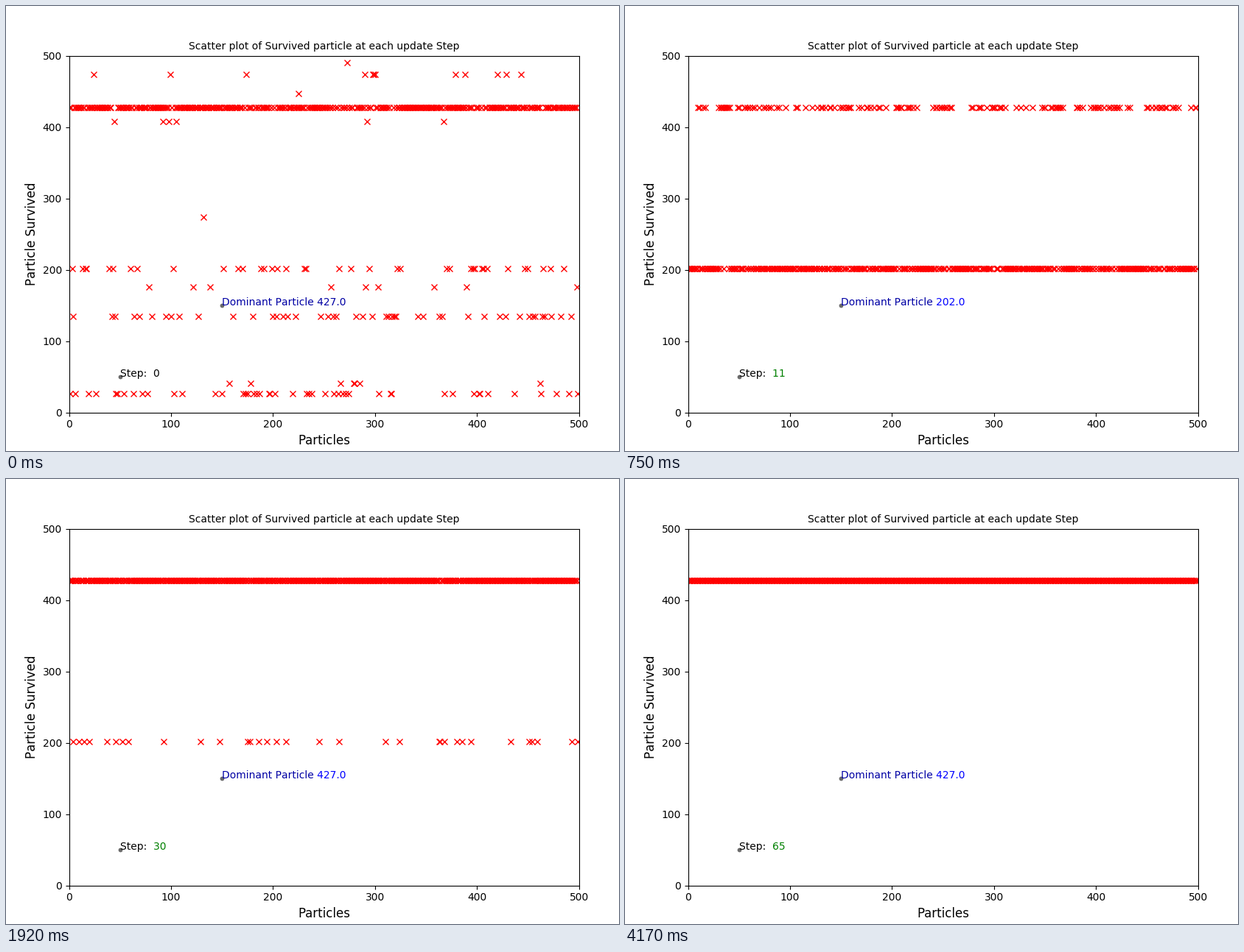
These frames come from a looping animation (832 px wide and 605 px high, 4.24 s). A matplotlib script:

```python
import numpy as np
import matplotlib.pyplot as plt
from matplotlib.animation import FuncAnimation
from matplotlib.transforms import Bbox, TransformedBbox

W, H, DPI = 832, 605, 100
LOOP, TICK, STEPS = 4240, 20, 66
LEAD = 24  # ms by which steps run ahead of an even split of the loop
N = 500
MAIN, RIVAL = 427, 202

plt.rcParams["font.family"] = "DejaVu Sans"
plt.rcParams["text.kerning_factor"] = 6  # whole-pixel kerning


def starting_levels():
    """Most particles on the main level, the others scattered over a few."""
    counts = {474: 12, 408: 6, RIVAL: 38, 176: 9, 135: 46, 41: 7, 26: 47}
    lone = {273: 490, 225: 447, 132: 274}
    minor = np.repeat(list(counts), list(counts.values()))
    levels = np.full(N, MAIN)
    rng = np.random.default_rng(7)
    levels[rng.choice(N, len(minor), replace=False)] = minor
    levels[list(lone)] = list(lone.values())
    return levels


first = starting_levels()
rest = first[(first != MAIN) & (first != RIVAL)]


def particles(step):
    """Levels of all particles after a number of resampling steps."""
    if step == 0:
        return first
    rng = np.random.default_rng(100 + step)
    share = np.interp(step, [0, 8, 17, 30, 37, 46],
                      [.08, .66, .83, .066, .09, 0])
    rival = round(N * share)
    other = round(len(rest) * max(0, 1 - step / 8) ** 1.5)
    levels = np.full(N, MAIN)
    levels[:rival] = RIVAL
    levels[rival:rival + other] = rng.choice(rest, other)
    return rng.permutation(levels)


def step_at(ms):
    return min(STEPS - 1, int((ms + LEAD) * STEPS / LOOP))


fig = plt.figure(figsize=(W / DPI, H / DPI), dpi=DPI, facecolor="white")
ax = fig.add_axes([85.6 / W, 52.3 / H, 692.08 / W, 485.1 / H])
ax.set(xlim=(0, N), ylim=(0, N))
ax.set_xticks(range(0, N + 1, 100))
ax.set_yticks(range(0, N + 1, 100))
ax.set_title("Scatter plot of Survived particle at each update Step",
             fontsize=10)
ax.set_xlabel("Particles", fontsize=12)
ax.set_ylabel("Particle Survived", fontsize=12)

marks, = ax.plot(np.arange(N), first, "rx", ms=6, mew=1)
ax.plot([50, 150], [50, 150], "o", color="0.42", ms=4.2, mew=0)


def two_tone(pos, split):
    """The same text twice, clipped left and right of the split."""
    parts = []
    for x0, x1 in ((0, split), (split, N)):
        box = TransformedBbox(Bbox.from_extents(x0, 0, x1, N), ax.transData)
        text = ax.text(pos, pos, "", fontsize=10, zorder=5)
        text.set_clip_on(True)
        text.set_clip_box(box)
        parts.append(text)
    return parts


def write(parts, text, colors):
    for part, color in zip(parts, colors):
        part.set_text(text)
        part.set_color(color)


step_label = two_tone(50, 80)
top_label = two_tone(150, 241)
NAVY = "#0000a4"


def draw(i):
    step = step_at(i * TICK)
    levels = particles(step)
    marks.set_ydata(levels)
    top = np.bincount(levels).argmax()
    write(step_label, f"Step:  {step}",
          ("black", "green" if step else "black"))
    write(top_label, f"Dominant Particle {top:.1f}",
          (NAVY, "blue" if step else NAVY))
    return [marks, *step_label, *top_label]


anim = FuncAnimation(fig, draw, frames=LOOP // TICK, interval=TICK,
                     init_func=lambda: draw(0), repeat=True, repeat_delay=0)
plt.show()
```
